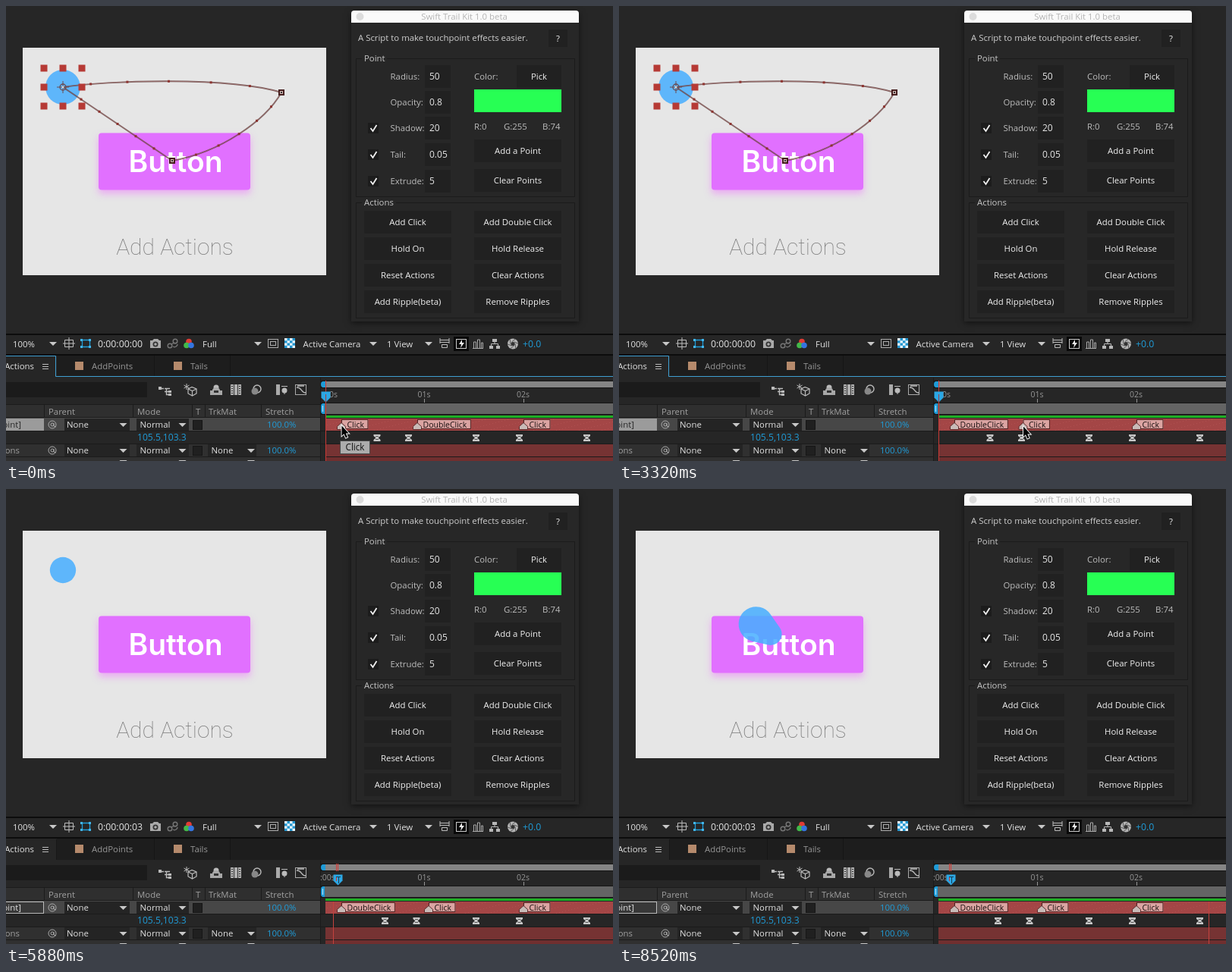
An HTML page with a canvas that plays this animation: 800x600 px, repeating every 8.56 s.

```html
<!DOCTYPE html>
<html lang="en">
<head>
<meta charset="utf-8">
<title>Touch point actions</title>
<style>
html, body { margin: 0; width: 100%; height: 100%; overflow: hidden; background: #262626; }
canvas { display: block; }
</style>
</head>
<body>
<canvas id="stage" width="800" height="600"></canvas>
<script>
const g = document.getElementById('stage').getContext('2d');
const LOOP = 8560, STEP = 40, PREVIEW = 5240;
const BLUE = '#1f9bd7', LIGHT = '#e2e2e2', DIM = '#969696', DARK = '#1b1b1b', RED = '#b63a35';
const LABEL = '#bdbdbd';
const UI_FONT = '"Open Sans", "Noto Sans", sans-serif';
const A = [75, 107], B = [363, 114], C = [219, 204];
const legs = [
  [A, [133, 98], [293, 93], B],
  [B, [342, 151], [283, 193], C],
  [C, [171, 172], [123, 139], A]
];

// ---------- drawing helpers ----------
function box(x, y, w, h, fill) { g.fillStyle = fill; g.fillRect(x, y, w, h); }
function frame(x, y, w, h, color, width = 1) {
  g.strokeStyle = color; g.lineWidth = width; g.strokeRect(x + .5, y + .5, w - 1, h - 1);
}
function stroke(d, color, width = 1) {
  g.strokeStyle = color; g.lineWidth = width; g.stroke(new Path2D(d));
}
function fill(d, color) { g.fillStyle = color; g.fill(new Path2D(d)); }
function disc(x, y, r, color) {
  g.fillStyle = color; g.beginPath(); g.arc(x, y, r, 0, 7); g.fill();
}
function ring(x, y, r, color, width = 1) {
  g.strokeStyle = color; g.lineWidth = width; g.beginPath(); g.arc(x, y, r, 0, 7); g.stroke();
}
// y is the middle of the line
function text(s, x, y, color = LIGHT, size = 11.4, align = 'left') {
  g.font = `500 ${size}px ${UI_FONT}`;
  g.textAlign = align; g.fillStyle = color; g.fillText(s, x, y + 4);
}
function arrow(x, y) { fill(`M${x - 5} ${y - 2}h10l-5 5z`, '#c8c8c8'); }
function button(s, x, y, w = 115) {
  box(x, y, w, 30, '#212121');
  text(s, x + w / 2, y + 15, '#f0f0f0', 11.4, 'center');
}

// ---------- motion helpers ----------
const smooth = u => u * u * (3 - 2 * u);
const between = (t, a, b) => t >= a && t < b;
function track(keys, t, ease = smooth) {
  if (t <= keys[0][0]) return keys[0].slice(1);
  for (let i = 1; i < keys.length; i++) {
    const a = keys[i - 1], b = keys[i];
    if (t < b[0]) {
      const u = ease((t - a[0]) / (b[0] - a[0]));
      return a.slice(1).map((v, k) => v + (b[k + 1] - v) * u);
    }
  }
  return keys[keys.length - 1].slice(1);
}
function bezier(leg, u) {
  const v = 1 - u, w = [v * v * v, 3 * v * v * u, 3 * v * u * u, u * u * u];
  return [0, 1].map(k => leg.reduce((sum, p, i) => sum + p[k] * w[i], 0));
}
// place of the dot when the time line stands at x
function place(x) {
  const leg = x < 541 ? 0 : x < 676 ? 1 : 2, [from, to] = [[499, 541], [619, 676], [765, 810]][leg];
  return bezier(legs[leg], Math.min(1, Math.max(0, (x - from) / (to - from))));
}
function radius(x) {
  const dip = Math.max(0, ...[433, 453, 557, 682].map(c => 1 - Math.abs(x - c) / 12));
  return 23 - 7 * dip;
}

const cursorKeys = [
  [0, 442, 553], [450, 442, 553], [950, 510, 554], [1200, 510, 554], [1600, 542, 554],
  [1800, 542, 554], [2320, 480, 551], [2400, 480, 551], [2700, 439, 552], [2800, 439, 552],
  [3050, 510, 554], [3150, 510, 554], [3500, 557, 554], [3600, 557, 554], [3850, 545, 562],
  [4200, 484, 577], [4300, 484, 577], [4400, 489, 569], [4480, 489, 569], [4700, 499, 569],
  [4950, 421, 512], [5000, 421, 512], [5160, 437, 512]
];
const clickKeys = [[450, 442], [950, 510], [3150, 510], [3500, 557]];
const doubleKeys = [[1800, 542], [2320, 483], [2400, 483], [2700, 442]];
const shiftKeys = [[4480, 0], [4700, 10.5]];
const headKeys = [[5000, 421], [5160, 437]];
const lineKeys = [[5804, 421], [5880, 431], [6880, 567], [8520, 777], [8560, 782]];
const presses = [[420, 500], [1720, 1840], [2240, 2420], [3080, 3200], [4440, 4520]];

// ---------- composition view ----------
function drawDot(x) {
  const [px, py] = place(x), [tx, ty] = place(x - 6);
  const r = radius(x), small = r * .64, d = Math.hypot(tx - px, ty - py);
  g.fillStyle = 'rgba(71,174,255,.85)';
  g.beginPath();
  if (d > r - small) {
    const dir = Math.atan2(ty - py, tx - px), off = Math.acos((r - small) / d);
    g.arc(px, py, r, dir + off, dir - off + 2 * Math.PI);
    g.arc(tx, ty, small, dir - off, dir + off);
    g.closePath();
  } else g.arc(px, py, r, 0, 7);
  g.fill();
}
function drawPath(picked) {
  for (const leg of legs) {
    const [p, a, b, q] = leg, d = `M${p}C${a} ${b} ${q}`;
    stroke(d, 'rgba(80,45,45,.7)', 1.9);
    stroke(d, 'rgba(190,120,115,.6)', .7);
    for (let i = 1; i < 6; i++) {
      const [x, y] = bezier(leg, i / 6);
      box(x - 1.5, y - 1.5, 3, 3, '#8d3430');
    }
  }
  for (const [x, y] of [B, C]) {
    box(x - 4, y - 4, 8, 8, '#451d1d');
    box(x - 2, y - 2, 4, 4, '#d2b6b2');
    box(x - 1, y - 1, 2, 2, '#333');
  }
  if (picked) {
    stroke('M75 107L133 98M363 114L293 93', RED, 1.3);
    disc(133, 98, 3.5, RED); disc(293, 93, 3.5, RED);
    box(358, 109, 10, 10, RED);
  }
  for (const x of [50, 75, 100]) for (const y of [82, 107, 132])
    if (x !== 75 || y !== 107) box(x - 4.5, y - 4.5, 9, 9, RED);
  if (picked) box(70, 102, 10, 10, 'rgba(182,58,53,.75)');
  ring(75, 107, 4, '#6b4a50', 1.3);
  stroke('M75 99v16M67 107h16', '#6b4a50', 1);
  disc(75, 107, 1.5, '#ddd');
}
function drawView(t, x, picked) {
  box(0, 0, 800, 434, '#262626');
  box(22, 55, 400, 300, '#e6e6e6');
  g.save();
  g.shadowColor = 'rgba(240,110,255,.5)'; g.shadowBlur = 10; g.shadowOffsetY = 5;
  g.fillStyle = '#e170ff';
  g.beginPath(); g.roundRect(122, 167.5, 200, 75, 4); g.fill();
  g.restore();
  g.textAlign = 'center';
  g.font = '600 39px Inter, Roboto, sans-serif';
  g.fillStyle = '#fff'; g.fillText('Button', 223.5, 219);
  g.font = '200 30px Roboto, Lato, sans-serif';
  g.fillStyle = '#7c7c7c'; g.fillText('Add Actions', 222.5, 327.5);
  drawDot(x);
  if (t < PREVIEW) drawPath(picked);
  if (between(t, 4160, 4440))
    stroke('M170 305.5H143.5V327M273 305.5h26.5V327', '#b98c8a');
}

// ---------- script panel ----------
function drawPanel() {
  g.save();
  g.shadowColor = 'rgba(0,0,0,.55)'; g.shadowBlur = 8; g.shadowOffsetY = 2;
  box(455, 7, 300, 409, '#272727');
  g.restore();
  g.fillStyle = '#fafafa';
  g.beginPath(); g.roundRect(455, 6, 300, 16, [4, 4, 0, 0]); g.fill();
  disc(466.5, 14, 5, '#dcdcdc');
  text('Swift Trail Kit 1.0 beta', 604, 13.5, '#b4b4b4', 11.4, 'center');
  text('A Script to make touchpoint effects easier.', 464, 42, '#cecece');
  box(715, 31, 25, 23, '#212121');
  text('?', 727.5, 43, '#f0f0f0', 11.4, 'center');

  for (const [name, y, h] of [['Point', 69, 183], ['Actions', 259, 153]]) {
    frame(461, y, 289, h, DARK);
    box(469, y - 1, name === 'Point' ? 33 : 45, 3, '#272727');
    text(name, 472, y, '#c8c8c8');
  }
  const fields = [['Radius:', '50', 93], ['Opacity:', '0.8', 127], ['Shadow:', '20', 161],
    ['Tail:', '0.05', 196], ['Extrude:', '5', 231]];
  fields.forEach(([name, value, y], i) => {
    text(name, 506.5, y, LABEL);
    box(552, y - 15, 34, 30, '#212121');
    text(value, 558, y, '#e6e6e6', 12);
    if (i > 1) {
      box(477, y - 7, 14, 14, '#1c1c1c');
      stroke(`M480.5 ${y}l3 4 5-8`, '#f2f2f2', 1.8);
    }
  });
  text('Color:', 617, 93, LABEL);
  button('Pick', 673, 78, 59);
  box(617, 110, 115, 30, '#27ff54');
  text('R:0', 617, 159, LABEL);
  text('G:255', 656, 159, LABEL);
  text('B:74', 707, 159, LABEL);
  button('Add a Point', 617, 176);
  button('Clear Points', 617, 215);
  [['Add Click', 'Add Double Click'], ['Hold On', 'Hold Release'],
    ['Reset Actions', 'Clear Actions'], ['Add Ripple(beta)', 'Remove Ripples']]
    .forEach(([left, right], i) => {
      button(left, 472, 270 + i * 35);
      button(right, 617, 270 + i * 35);
    });
}

// ---------- bar under the view ----------
function drawToolbar(t) {
  box(0, 432, 800, 30, '#0c0c0c');
  box(0, 434, 800, 25, '#262626');
  text('100%', 9, 446);
  text(t < 5080 ? '0:00:00:00' : '0:00:00:03', 121, 446, LIGHT, 12.3);
  text('Full', 259, 446);
  text('Active Camera', 391.5, 446);
  text('1 View', 502, 446);
  text('+0.0', 681, 446, BLUE, 12.3);
  [62, 332, 484, 557].forEach(x => arrow(x, 445));

  stroke('M77.5 440.5h11v9h-11zM83 437v16M75 445h16', '#bcbcbc');
  stroke('M100.5 440.5h10v9h-10z', BLUE, 1.3);
  for (const x of [98, 109]) for (const y of [439, 448]) box(x, y, 3, 3, '#42b6ec');
  fill('M190 441h3l2-2h5l2 2h2v10h-14z', '#aaa');
  disc(197, 446, 3.5, '#333'); disc(197, 446, 1.8, '#aaa');
  ring(223, 442, 2.8, '#777', 1.4); ring(216, 448, 2.8, '#777', 1.4);
  stroke('M218 446c3-3 6 0 7-2M220 449c3 2 6-1 6-3', '#777', 1.4);
  disc(241, 442.5, 3.8, '#e13c35'); disc(238, 447.5, 3.8, '#43b94a'); disc(244, 447.5, 3.8, '#3575e0');
  frame(345, 439, 14, 12, '#aaa'); frame(348, 442, 8, 6, '#aaa');
  box(367, 438, 14, 13, '#e8f4fa');
  for (let i = 0; i < 16; i++)
    if ((i + (i >> 2)) % 2) box(367 + i % 4 * 3.5, 438 + (i >> 2) * 3.25, 3.5, 3.25, '#2296d0');
  stroke('M572 440.5h12M572 443.5h12M574.5 446.5h7v4h-7zM572 438v7M584 438v7', '#bbb');
  box(590, 436, 20, 19, '#080808'); frame(593, 439, 14, 13, '#ccc');
  fill('M601 440l-4 6h3l-1 5 5-7h-3z', '#eee');
  stroke('M615 451.5h14M616.5 451v-8h3v8M621.5 451v-11h3v11M626.5 451v-7h2v7', '#aaa');
  fill('M641 439h6v4h-6zM637 448h5v4h-5zM646 448h5v4h-5z', '#b8b8b8');
  stroke('M644 443v2.5M639.5 448v-2.5h9v2.5', '#b8b8b8');
  disc(668, 445.5, 7, '#b5b5b5');
  for (let i = 0; i < 6; i++) {
    const a = i * Math.PI / 3;
    stroke(`M${668 + 3 * Math.cos(a)} ${445.5 + 3 * Math.sin(a)}L${668 + 7 * Math.cos(a + 1)} ${445.5 + 7 * Math.sin(a + 1)}`, '#555');
  }
  disc(668, 445.5, 2.6, '#333');
}

// ---------- timeline, left side ----------
function drawSpiral(y) {
  ring(61, y, 5, '#aaa'); ring(61, y, 2, '#aaa');
  stroke(`M63 ${y - 2}v4l3 1`, '#aaa');
}
function drawRowControls(y) {
  drawSpiral(y);
  box(77, y - 8, 86, 16, '#242424'); text('None', 80, y); arrow(154.5, y);
  box(172, y - 8, 69, 16, '#242424'); text('Normal', 176.5, y); arrow(232.5, y);
  box(246, y - 6, 13, 13, '#202020'); frame(246, y - 6, 13, 13, '#161616');
  text('100.0%', 344, y, BLUE);
}
function drawLayers(t, picked) {
  box(0, 461, 800, 139, '#262626');
  box(67, 461, 733, 28, '#1d1d1d');
  box(195, 461, 1, 28, '#161616'); box(295, 461, 1, 28, '#161616');
  text('Actions', 37, 475, LIGHT, 11.4, 'right');
  stroke('M48 472.5h8M48 475.5h8M48 478.5h8', '#bbb');
  for (const [name, x] of [['AddPoints', 91], ['Tails', 221]]) {
    box(x, 469, 11, 11, '#b58a6c');
    text(name, x + 22, 475, DIM);
  }
  if (t < PREVIEW) stroke('M0 461.5h65.5v27h735', '#3f9fd2');
  else stroke('M66.5 462v27', '#181818');

  box(0, 496, 186, 20, DARK);
  stroke('M202 504.5h6M209 504.5h7M211.5 504.5v8h5M209 508.5h7', '#bbb', 1.4);
  fill('M201 502h4v4h-4zM214 507h4v3h-4zM214 511h4v3h-4z', '#bbb');
  stroke('M240 505l5-2.5 6 2.5v6l-5.5 3-5.5-3zM240 505l5.5 2.5 5.5-2.5M245.5 507.5v6', '#bbb', 1.2);
  stroke('M238 498v8M234.5 500l7 4M234.5 504l7-4', '#bbb');
  disc(277, 503, 3.5, '#bbb'); fill('M269 507h16v6h-16zM272 507c0-5 10-5 10 0z', '#a8a8a8');
  box(274, 507, 6, 3, '#333');
  box(296, 499, 14, 14, '#b0b0b0'); box(300, 499, 1, 14, '#333'); box(305, 499, 1, 14, '#333');
  for (let y = 501; y < 513; y += 3) { box(297, y, 2, 1, '#333'); box(307, y, 2, 1, '#333'); }
  ring(331, 505, 5, '#bbb', 1.4); disc(328, 508, 4.5, '#888');
  box(356, 499, 5, 14, '#aaa');
  stroke('M363 501.5h8M367 504v8', '#bbb'); disc(367, 507, 3.5, '#bbb');
  frame(381, 499, 15, 14, '#aaa'); stroke('M383 503c8 0 5 7 12 7M384 501h9', '#bbb', 1.3);

  box(0, 525, 414, 18, DARK); box(0, 526, 414, 16, '#2f2f2f');
  [['Parent', 56], ['Mode', 173], ['T', 250], ['TrkMat', 267], ['Stretch', 342]]
    .forEach(([s, x]) => text(s, x, 535, '#a0a0a0'));
  [50, 167, 245, 262, 336].forEach(x => box(x, 526, 1, 16, DARK));

  box(0, 543, 414, 17, '#474747');
  const outlined = t >= 4000;
  box(0, 544, 50, 16, outlined ? '#383838' : '#9b9b9b');
  if (outlined) frame(-2, 544, 52, 16, '#bcbcbc');
  text('[Point]', 20, 552, outlined ? LIGHT : '#262626', 11.4, 'right');
  drawRowControls(552);
  box(0, 560, 414, 1, DARK);
  if (picked) box(0, 561, 50, 16, '#555');
  text('105.5,103.3', 173, 569, BLUE, 12.1);
  box(0, 577, 414, 1, DARK);
  box(0, 578, 414, 16, '#303030');
  text('Actions', 18, 586, '#a0a0a0', 11.4, 'right');
  drawRowControls(586);
  box(266, 578, 64, 16, '#242424'); text('None', 270.5, 586); arrow(323, 586);
  box(0, 594, 414, 1, DARK);
  box(0, 595, 414, 5, '#303030');
  arrow(154.5, 601); arrow(232.5, 601); arrow(323, 601);
}

// ---------- timeline, right side ----------
function drawMarker(name, m) {
  g.font = `500 10.5px ${UI_FONT}`;
  const w = g.measureText(name).width + 13;
  box(m, 545, w, 13, '#dba4a2');
  frame(m, 545, w, 13, '#4d2222');
  text(name, m + 7.5, 551.5, '#1a1010', 10.5);
  const d = `M${m - 5.5} 558.5v-4l5.5-5 5.5 5v4z`;
  fill(d, '#c9bbb8'); stroke(d, '#5e2b2b');
}
function drawKeyframe(x, on) {
  fill(`M${x - 4.5} 565h9v2l-3 2.5 3 2.5v2h-9v-2l3-2.5-3-2.5z`, on ? '#35b4ef' : '#c9c9c9');
  const notch = on ? '#1c4a60' : '#555';
  box(x - 2, 567, 4, 1, notch); box(x - 2, 571, 4, 1, notch);
}
function drawTracks(t, head, line, picked) {
  box(414, 490, 386, 110, '#262626');
  box(414, 490, 1, 110, DARK);
  box(415, 494, 385, 10, '#141414'); box(421, 495, 379, 8, '#858585');
  fill('M421 495h-3q-3 0-3 4t3 4h3z', BLUE);
  text(head < 425 ? '0s' : ':00s', head < 425 ? 426 : 414, 512, DIM, 10.5);
  text('01s', 551, 512, DIM, 10.5, 'center');
  text('02s', 681.5, 512, DIM, 10.5, 'center');
  for (const x of [551, 682]) box(x, 518, 1, 5, DIM);
  box(415, 523, 385, 16, '#141414'); box(420, 524, 380, 14, '#646464');
  fill('M420 524h-2q-3 0-3 4v6q0 4 3 4h2z', BLUE); box(417, 527, 1, 8, '#bfe6fa');
  box(421, 540, 379, 3, '#1fae25');

  box(421, 544, 379, 16, '#a44646');
  for (let i = 0; i < 190; i++) box(421 + i * 2, 545 + i * 7 % 15, 1, 1, '#af5050');
  box(415, 560, 385, 1, DARK);
  box(415, 577, 385, 1, DARK);
  box(421, 578, 379, 16, '#763333');
  box(421, 594, 379, 1, DARK);
  box(421, 595, 379, 5, '#702f2f');

  [['Click', track(clickKeys, t)[0]], ['DoubleClick', track(doubleKeys, t)[0]], ['Click', 682]]
    .sort((a, b) => a[1] - b[1]).forEach(([name, m]) => drawMarker(name, m));
  const shift = track(shiftKeys, t)[0];
  [489 + shift, 530.5 + shift, 619.5, 676.5, 765.5]
    .forEach((x, i) => drawKeyframe(x, picked && i < 2));

  if (t < PREVIEW) box(head, 503, 1, 97, '#c93934');
  else { box(line, 544, 1, 56, '#c4423e'); box(head - 2, 494, 1, 10, '#d83a35'); }
  box(head, 494, 1, 10, '#d83a35');
  fill(`M${head - 5.5} 508.5h12v8l-6 6-6-6z`, '#2ca7e4');
  if (head < 425) box(head, 512, 1, 10, '#a23b40');
  else {
    box(head - 2, 511, 6, 1, '#173b52');
    box(head - 2, 512, 1, 5, '#d83a35');
    box(head + 1, 512, 1, 8, '#173b52');
  }
}

// ---------- pointer ----------
function tooltip(s, x, y, w) {
  box(x, y, w, 18, '#acacac'); frame(x, y, w, 18, '#4a4a4a');
  text(s, x + w / 2, y + 9, '#111', 11.7, 'center');
}
function drawPointer(t) {
  if (t < 400) tooltip('Click', 440, 573, 40);
  else if (t < 1160) tooltip('Click', 442, 577, 40);
  if (between(t, 1640, 2720)) tooltip('DoubleClick', 541, 576, 78);
  if (t >= PREVIEW) return;
  const [x, y] = track(cursorKeys, t);
  if (presses.some(([a, b]) => between(t, a, b))) {
    ring(x + 1, y + 2, 21.5, 'rgba(255,255,255,.45)', 1);
    ring(x + 1, y + 2, 22.5, '#141414', 1.6);
  }
  const d = `M${x + .5} ${y + .5}v13.5l3-2.800 2.300 5.300 2.300-1-2.300-5h4z`;
  stroke(d, '#fff', 1.8); fill(d, '#000');
}

function draw() {
  const t = Math.floor(performance.now() % LOOP / STEP) * STEP;
  const picked = between(t, 4000, 4960);
  const head = Math.round(track(headKeys, t)[0]);
  const line = track(lineKeys, t, u => u)[0];
  drawView(t, t < PREVIEW ? head : line, picked);
  drawPanel();
  drawToolbar(t);
  drawLayers(t, picked);
  drawTracks(t, head, Math.round(line), picked);
  drawPointer(t);
  requestAnimationFrame(draw);
}
draw();
</script>
</body>
</html>
```
